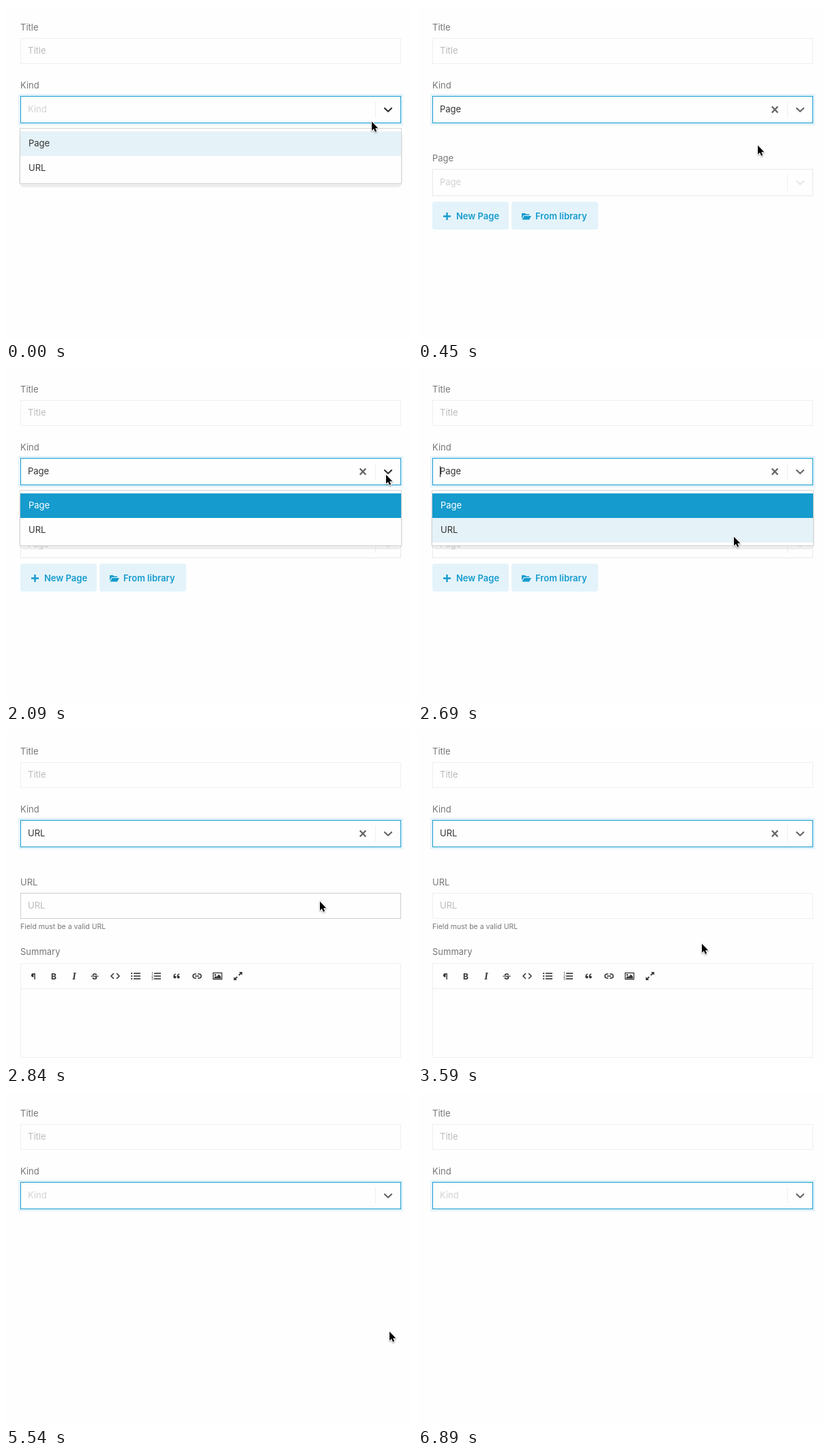
Recreate the animation shown at these times as an HTML page with a canvas. Size 595 by 490 pixels, loop 7040 ms.

```html
<!DOCTYPE html>
<html lang="en">
<head>
<meta charset="utf-8">
<title>Kind selector form</title>
<style>
html, body { margin: 0; width: 100%; height: 100%; overflow: hidden; background: #fefefe; }
canvas { display: block; }
</style>
</head>
<body>
<canvas id="stage" width="595" height="490"></canvas>
<script>
const ctx = document.getElementById('stage').getContext('2d');
const LOOP = 7040, STEP = 150;
const BLUE = '#159bcd', PALE = '#e4f3fa', INK = '#333', LABEL = '#777',
  HINT = '#bbb', FAINT = '#d2d2d2', LINE = '#efefef', HOVER = '#cecece', BG = '#fefefe';
const SANS = 'Inter, Roboto, sans-serif';

// Places where the pointer turns or rests: time, x, y
const stops = [
  [0, 536, 169], [590, 491, 210], [890, 491, 210], [1340, 457, 267],
  [2090, 557, 156], [2690, 463, 247], [3590, 416, 313], [3740, 424, 425],
  [4340, 519, 149], [4940, 519, 149], [5540, 562, 351], [5690, 572, 375],
  [6140, 562, 1], [6590, 541, 433], [LOOP, 541, 433]
];

function pointer(t) {
  const at = Math.max(0, Math.floor((t - 140) / STEP) * STEP + 140);
  const i = stops.findIndex(s => s[0] > at);
  const [t0, x0, y0] = stops[i - 1], [t1, x1, y1] = stops[i];
  const k = (1 - Math.cos(Math.PI * (at - t0) / (t1 - t0))) / 2;
  return { x: Math.round(x0 + (x1 - x0) * k), y: Math.round(y0 + (y1 - y0) * k) };
}

function text(s, x, y, color, font = '13px ' + SANS, align = 'left') {
  ctx.font = font;
  ctx.textAlign = align;
  ctx.fillStyle = color;
  ctx.fillText(s, x, y);
}

function fill(x, y, w, h, color, r = 0) {
  ctx.fillStyle = color;
  ctx.beginPath();
  ctx.roundRect(x, y, w, h, r);
  ctx.fill();
}

function box(x, y, w, h, color) {
  ctx.lineWidth = 1;
  ctx.strokeStyle = color;
  ctx.strokeRect(x + .5, y + .5, w - 1, h - 1);
}

function lines(color, width, path) {
  ctx.strokeStyle = color;
  ctx.lineWidth = width;
  ctx.stroke(new Path2D(path));
}

function shape(color, path) {
  ctx.fillStyle = color;
  ctx.fill(new Path2D(path));
}

function at(x, y, draw) {
  ctx.save();
  ctx.translate(x, y);
  draw();
  ctx.restore();
}

function arrowDown(y, color) {
  fill(541, y - 12, 1, 24, LINE);
  at(560, y, () => {
    ctx.lineCap = ctx.lineJoin = 'round';
    lines(color, 2.2, 'M-5 -2L0 2.8L5 -2');
  });
}

function titleField(hover) {
  text('Title', 21, 36, LABEL);
  box(21, 47, 558, 38, hover ? HOVER : LINE);
  text('Title', 32, 70, HINT);
}

function kindField(s) {
  text('Kind', 21, 121, LABEL);
  fill(18, 129, 564, 46, PALE);
  fill(21, 132, 558, 40, BG);
  box(21, 132, 558, 40, BLUE);
  text(s.value || 'Kind', 32, 156, s.value ? INK : FAINT);
  if (s.caret) fill(32, 144, 1, 16, '#222');
  arrowDown(152, s.overArrow ? INK : '#666');
  if (s.value)
    at(523, 152, () => lines(s.overClear ? INK : '#666', 2.4, 'M-4.3 -4.5L4.3 4.5M4.3 -4.5L-4.3 4.5'));
}

function button(x, w, label, icon) {
  fill(x, 287, w, 41, PALE, 4);
  at(x + 15, 308.5, icon);
  text(label, x + 35, 313, BLUE, '600 13px ' + SANS);
}

function plusIcon() {
  lines(BLUE, 2.4, 'M1 0H12M6.5 -5.5V5.5');
}

function folderIcon() {
  shape(BLUE, 'M0 -4.5H5L6.5 -3H11V-1.5H3L0 3.5ZM3.6 -.5H14L11 5H.6Z');
}

function pageForm(hover) {
  text('Page', 21, 228, LABEL);
  box(21, 239, 558, 40, hover ? HOVER : '#e9e9e9');
  text('Page', 32, 263, FAINT);
  arrowDown(259, '#e6e6e6');
  button(21, 112, 'New Page', plusIcon);
  button(137, 127, 'From library', folderIcon);
}

const listIcon = numbered => () => {
  for (let i = -1; i < 2; i++) {
    fill(-3, i * 4 - .8, 10, 1.6, INK);
    if (numbered) text(i + 2, -5.5, i * 4 + 1.8, INK, '5px ' + SANS, 'center');
    else fill(-7, i * 4 - 1.1, 2.4, 2.2, INK, 1);
  }
};

function linkIcon() {
  lines(INK, 1.6, 'M-1 -3H-3A3 3 0 0 0 -3 3H-1M1 -3H3A3 3 0 0 1 3 3H1M-3 0H3');
}

function imageIcon() {
  lines(INK, 1.2, 'M-6.4 -4.6H6.4V4.6H-6.4Z');
  fill(-4.6, -3, 2.6, 2.6, INK, 1.3);
  shape(INK, 'M-5 3.4V2L-2.6 0L-1.2 1L2 -2.4L5 1V3.4Z');
}

function expandIcon() {
  for (const turn of [0, Math.PI]) {
    ctx.rotate(turn);
    lines(INK, 1.8, 'M1.2 -1.2L5 -5');
    shape(INK, 'M1.4 -6H6.2V-1.2Z');
  }
}

function quoteIcon() {
  for (const x of [-2.6, 2.6]) {
    fill(x - 2, -.6, 4, 4, INK, 2);
    at(x, 0, () => lines(INK, 1.4, 'M-1.3 1.2L-1 -1.6L1.4 -3.3'));
  }
}

function strikeIcon() {
  glyph('S', 'bold 12px ' + SANS)();
  fill(-5.5, -1, 11, 2, BG);
  fill(-5.5, -.4, 11, 1.2, INK);
}

const glyph = (s, font) => () => text(s, 0, 4.5, INK, font, 'center');
const tools = [
  glyph('¶', 'bold 12px ' + SANS),
  glyph('B', 'bold 12px ' + SANS),
  glyph('I', 'italic bold 14px "Liberation Serif", serif'),
  strikeIcon,
  () => lines(INK, 1.5, 'M-2 -4L-6 0L-2 4M2 -4L6 0L2 4'),
  listIcon(false), listIcon(true), quoteIcon, linkIcon, imageIcon, expandIcon
];

function urlForm(hover) {
  text('URL', 21, 228, LABEL);
  box(21, 239, 558, 38, hover ? HOVER : LINE);
  text('URL', 32, 262, HINT);
  text('Field must be a valid URL', 21, 292, LABEL, '10.5px ' + SANS);
  text('Summary', 21, 330, LABEL);
  box(21, 342, 558, 139, LINE);
  fill(21, 379, 558, 1, LINE);
  tools.forEach((draw, i) => at(40 + 30 * i, 361, draw));
}

function menu(value, p) {
  fill(19, 184, 562, 82, 'rgba(0,0,0,.065)', 8);
  fill(20, 179, 560, 82, '#d4d4d4', 1);
  fill(21, 180, 558, 80, BG);
  const hot = p.y >= 220 ? 1 : 0;
  ['Page', 'URL'].forEach((name, i) => {
    const y = 184 + 36 * i, chosen = name === value;
    if (chosen || i === hot) fill(21, y, 558, 36, chosen ? BLUE : '#e5f2f8');
    text(name, 33, y + 22, chosen ? '#fff' : INK);
  });
}

function drawPointer(p) {
  at(p.x, p.y, () => {
    const arrow = new Path2D('M0 .5V13.8L3 11L5 15.7L7.2 14.8L5.2 10.2H9.3Z');
    ctx.shadowColor = 'rgba(0,0,0,.35)';
    ctx.shadowBlur = 2;
    ctx.shadowOffsetY = 1;
    ctx.strokeStyle = '#fff';
    ctx.lineWidth = 2;
    ctx.lineJoin = 'round';
    ctx.stroke(arrow);
    ctx.shadowColor = 'transparent';
    ctx.fillStyle = '#000';
    ctx.fill(arrow);
  });
}

function draw(t) {
  const during = (a, b) => t >= a && t < b;
  const p = pointer(t);
  const shown = t < 6890;
  const over = (top, bottom) => shown && p.y >= top && p.y <= bottom;
  const onKind = over(132, 172);
  const value = during(440, 2840) ? 'Page' : during(2840, 4640) ? 'URL' : '';
  const open = t < 440 || during(2090, 2840);

  fill(0, 0, 595, 490, BG);
  titleField(over(47, 85));
  kindField({
    value,
    caret: during(2540, 2840),
    overArrow: t < STEP || (onKind && p.x > 541),
    overClear: onKind && p.x > 512 && p.x < 535
  });
  if (value === 'Page') pageForm(!open && over(239, 279));
  if (value === 'URL') urlForm(over(239, 277));
  if (open) menu(value, p);
  if (shown) drawPointer(p);
}

const start = performance.now();
function tick() {
  draw((performance.now() - start) % LOOP);
  requestAnimationFrame(tick);
}
tick();
</script>
</body>
</html>
```
